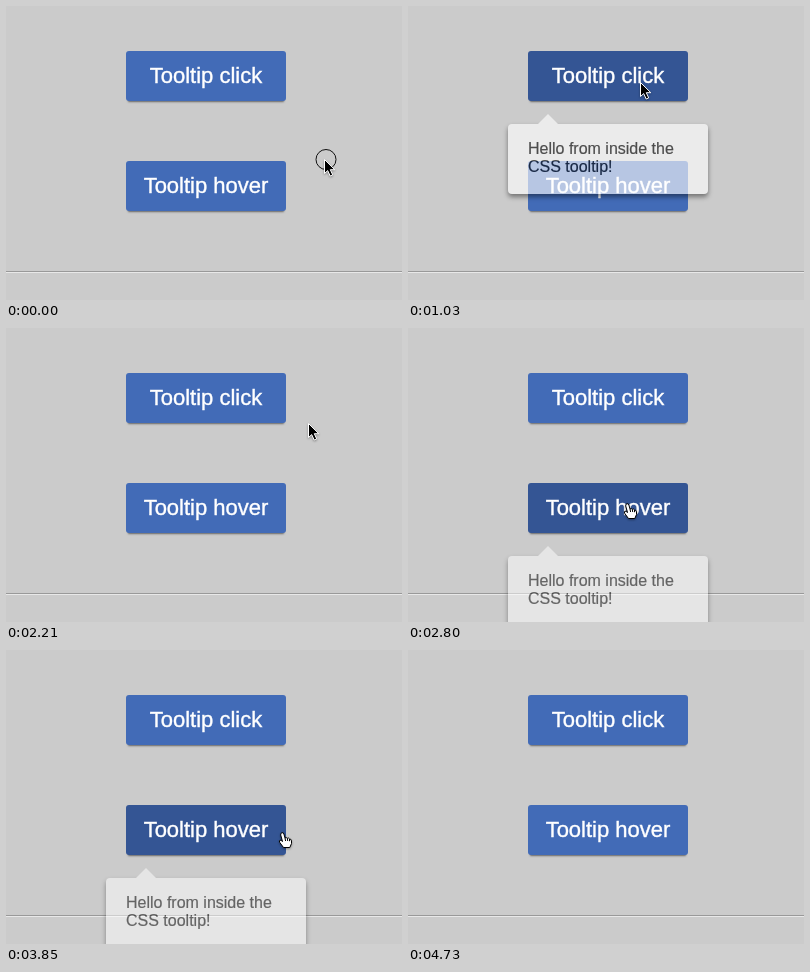
These frames come from a looping animation (396x294 px, 5050 ms). An HTML page:

```html
<!DOCTYPE html>
<html lang="en">
<head>
<meta charset="utf-8">
<title>Tooltip demo</title>
<style>
  html, body { margin: 0; width: 100%; height: 100%; overflow: hidden; background: #cbcbcb; }
  body { position: relative; font-family: "Liberation Sans", Arial, sans-serif; cursor: default; }
  .rule {
    position: absolute; left: 0; right: 0; top: 265px; height: 1px;
    background: #999; border-bottom: 1px solid #e8e8e8;
  }
  .button {
    --dark: 0;
    position: absolute; left: 120px; width: 160px; height: 50px;
    border-radius: 3px; text-align: center; font-size: 22px; line-height: 50px;
    white-space: nowrap; color: #fff; -webkit-text-stroke: .4px;
    background: color-mix(in srgb, #345594 calc(var(--dark) * 100%), #426bb7);
    box-shadow: 0 3px 2px -2px rgba(0, 0, 0, .5);
  }
  .tip {
    position: absolute; left: 100px; width: 180px; height: 54px;
    padding: 16px 0 0 20px; border-radius: 4px; opacity: 0;
    font-size: 16px; line-height: 18px; white-space: nowrap; color: #000;
    -webkit-text-stroke: .2px;
    background: #fff; box-shadow: 0 3px 5px rgba(0, 0, 0, .7);
  }
  .tip::before {
    content: ""; position: absolute; left: 30px; top: -10px;
    border: solid transparent; border-width: 0 10px 10px; border-bottom-color: #fff;
  }
  .first { top: 45px; }
  .second { top: 155px; }
  .tip.first { top: 118px; }
  .tip.second { top: 228px; }
  svg { position: absolute; left: 0; top: 0; }
  #pointer { filter: drop-shadow(0 1px 1px rgba(0, 0, 0, .35)); }
</style>
</head>
<body>
<div class="rule"></div>
<div class="button first" id="clickButton">Tooltip click</div>
<div class="button second" id="hoverButton">Tooltip hover</div>
<div class="tip first" id="clickTip">Hello from inside the<br>CSS tooltip!</div>
<div class="tip second" id="hoverTip">Hello from inside the<br>CSS tooltip!</div>
<svg width="396" height="294" viewBox="0 0 396 294">
  <circle id="ring" cx="320" cy="153.500" r="10" fill="none" stroke="#111"/>
  <g id="pointer">
    <path id="arrow" d="M.5 .5V14.500L3.700 11.600 6.200 17 8.700 15.900 6.300 10.700H10.800Z"
      fill="#000" stroke="#fff" stroke-linejoin="round"/>
    <path id="hand" d="M-2.500 1.500L-4.300-5Q-4.500-7-3-7.300T-1.100-6L0-2Q1.200-3.200 2.300-1.700 3.600-2.600 4.500-1 6.300-1.200 6.500 1V3.500L4.800 7.500H-1.500L-5.200 2.500Q-6.300 .6-5 .1-3.800 .2-2.500 1.500ZM0-2L.6 1M2.300-1.700L2.700 1M4.500-1V1.200"
      fill="#fff" stroke="#000" stroke-linejoin="round"/>
  </g>
</svg>
<script>
  const LOOP = 5050, TICK = 147.7, LEAD = 6;
  const $ = id => document.getElementById(id);

  // Pointer moves; a higher power slows down more towards the end.
  const moves = [
    { from: 0, to: 6, x: 232, y: 76, power: 1 },
    { from: 9, to: 13, x: 302, y: 95, power: 1.3 },
    { from: 15, to: 17, x: 336, y: 166, power: 1 },
    { from: 17, to: 19, x: 222, y: 183, power: 1 },
    { from: 25, to: 32, x: 396, y: 203, power: 2.6 }
  ];

  const ramp = (t, from, to) => Math.min(1, Math.max(0, (t - from) / (to - from)));
  const pulse = (t, on, full, off, gone) => ramp(t, on, full) - ramp(t, off, gone);

  function pointerAt(tick) {
    let x = 318, y = 153;
    for (const move of moves) {
      const p = 1 - (1 - ramp(tick, move.from, move.to)) ** move.power;
      x += (move.x - x) * p;
      y += (move.y - y) * p;
    }
    return [x, y];
  }

  function show(id, on) {
    $(id).style.display = on ? "" : "none";
  }

  function draw(ms) {
    // The screen refreshes only once per tick.
    const tick = Math.floor((ms % LOOP + LEAD) / TICK);
    const [x, y] = pointerAt(tick);
    const overLink = x > 120 && x < 280 && y > 155 && y < 205 && tick >= 19;
    $("pointer").setAttribute("transform", `translate(${x.toFixed()} ${y.toFixed()})`);
    show("pointer", x < 396);
    show("arrow", !overLink);
    show("hand", overLink);
    show("ring", tick === 0);
    $("clickButton").style.setProperty("--dark", pulse(tick, 4, 6, 12, 15));
    $("hoverButton").style.setProperty("--dark", pulse(tick, 17, 19, 27, 29));
    $("clickTip").style.opacity = pulse(tick, 5.7, 7.8, 12, 15);
    $("hoverTip").style.opacity = pulse(tick, 18, 20, 25, 27);
  }

  const start = performance.now();
  function loop() {
    draw(performance.now() - start);
    requestAnimationFrame(loop);
  }
  loop();
</script>
</body>
</html>
```
